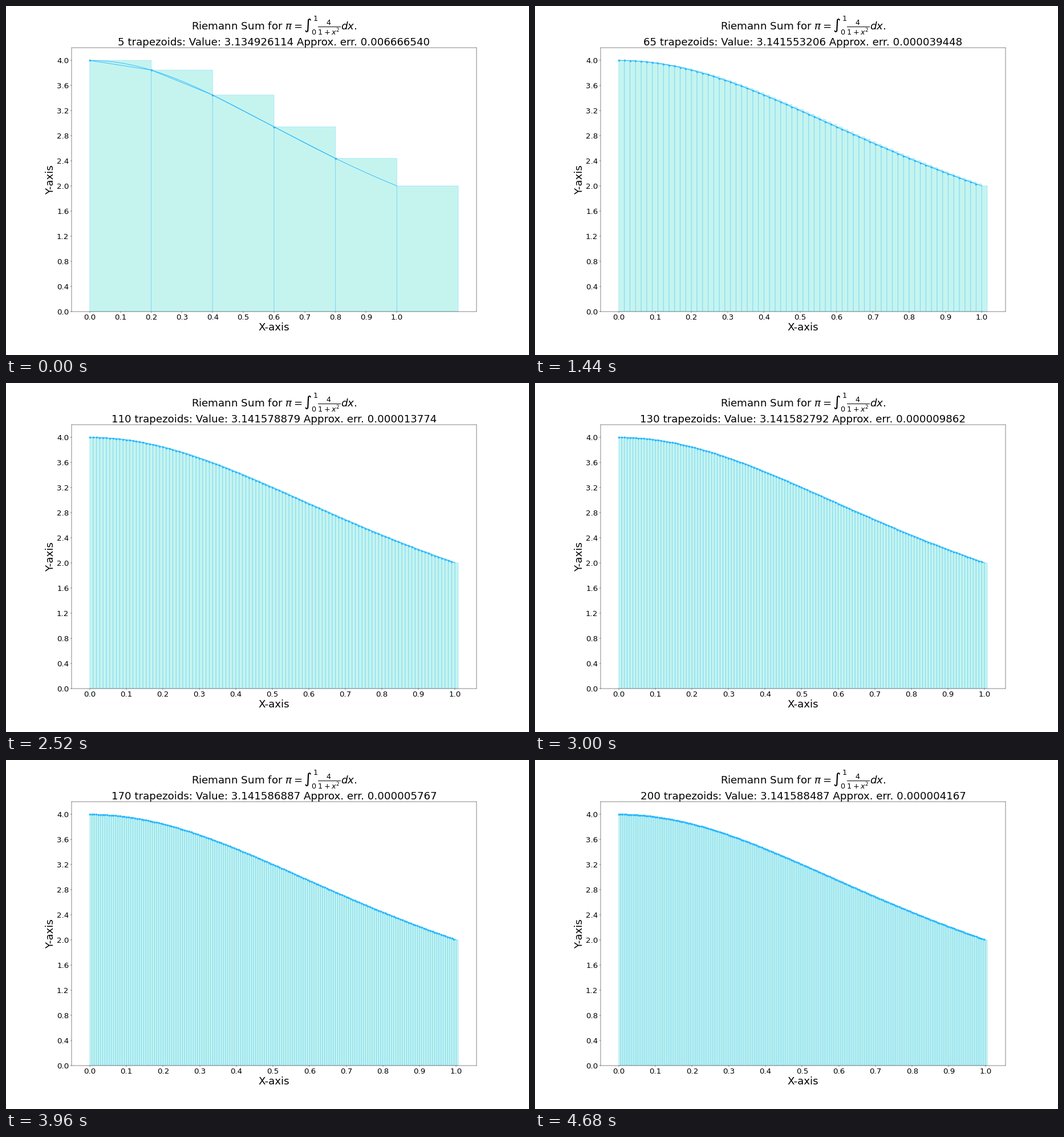
Animation of 917x611 px, one loop 4.8 s. Source, as a matplotlib script:

```python
import numpy as np
import matplotlib.pyplot as plt
from matplotlib.animation import FuncAnimation

W, H, DPI = 917, 611, 64
FRAMES, INTERVAL, STEP = 40, 120, 5
PT = W / 21 / DPI  # sizes below are points on a 21-inch wide sheet

FILL, LINE = "#40dccc", "#29b8ff"

plt.rcParams.update({
    "font.family": "DejaVu Sans",
    "axes.titlesize": 30 * PT,
    "axes.labelsize": 30 * PT,
    "axes.titlepad": 6 * PT,
    "axes.labelpad": 4 * PT,
    "axes.linewidth": 0.8 * PT,
    "lines.linewidth": 1.5 * PT,
    "lines.markeredgewidth": 1.0 * PT,
})
for axis in ("xtick", "ytick"):
    plt.rcParams.update({
        f"{axis}.labelsize": 22 * PT,
        f"{axis}.major.size": 3.5 * PT,
        f"{axis}.major.width": 0.8 * PT,
        f"{axis}.major.pad": 3.5 * PT,
    })


def f(x):
    return 4 / (1 + x * x)


def trapezoid_sum(y, h):
    return h * (y.sum() - (y[0] + y[-1]) / 2)


fig = plt.figure(figsize=(W / DPI, H / DPI), dpi=DPI, facecolor="white")
ax = fig.add_axes([0.125, 0.125, 0.775, 0.755])
smooth = np.linspace(0, 1, 200)


def draw(frame):
    n = STEP * (frame + 1)
    h = 1 / n
    x = np.linspace(0, 1, n + 1)
    y = f(x)
    area = trapezoid_sum(y, h)

    ax.clear()
    ax.bar(x, y, width=h, align="edge", color=FILL, edgecolor=LINE,
           alpha=0.3, linewidth=1.5 * PT, snap=False)
    ax.plot(smooth, f(smooth), color=LINE)
    ax.plot(x[:-1], y[:-1], color=LINE, marker=".", markersize=10 * PT)

    margin = 0.05 * (1 + h)
    ax.set_xlim(-margin, 1 + h + margin)
    ax.set_ylim(0, 4.2)
    ax.set_xticks(np.linspace(0, 1, 11))
    ax.set_yticks(np.linspace(0, 4, 11))
    ax.set_xlabel("X-axis")
    ax.set_ylabel("Y-axis")
    ax.set_title(
        r"Riemann Sum for $\pi = \int_0^1 \frac{4}{1+x^2} dx$." + "\n"
        f"{n} trapezoids: Value: {area:.9f} Approx. err. {abs(np.pi - area):.9f}")
    return ax.get_children()


anim = FuncAnimation(fig, draw, frames=FRAMES, interval=INTERVAL,
                     init_func=lambda: [], repeat=True, repeat_delay=0)
plt.show()
```
